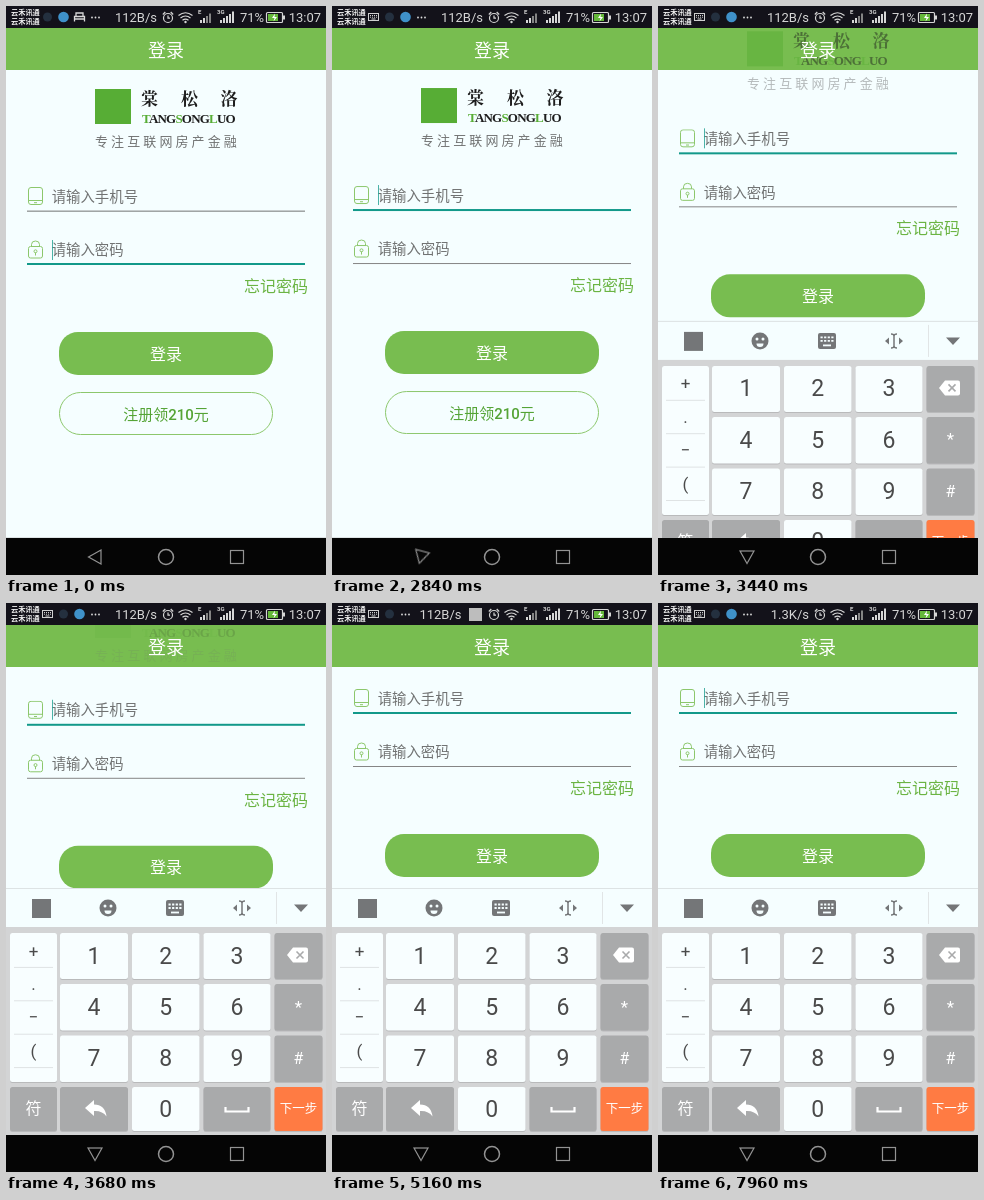
Animation of 320x569 px, one loop 8 s. Source, as an HTML page:

```html
<!DOCTYPE html>
<html lang="zh-CN">
<head>
<meta charset="utf-8">
<title>登录</title>
<style>
html, body { margin: 0; width: 100%; height: 100%; overflow: hidden; background: #000; }
svg { display: block; width: 100vw; height: 100vh; }
text { font-family: Roboto, "Noto Sans CJK SC", "Noto Sans CJK", sans-serif; }
.mid { text-anchor: middle; }
.end { text-anchor: end; }
.serif { font-family: "Liberation Serif", "Noto Serif CJK SC", "Noto Serif", "Noto Sans CJK SC", serif; font-weight: bold; }
.line { fill: none; stroke: #8cc76c; stroke-width: 1; }
.hint { font-size: 14.4px; fill: #707272; }
.teal { fill: #12998a; }
.nav { fill: none; stroke: #939393; stroke-width: 1.2; }

/* smooth motion */
.form, .logo, .fade, .keyboard, .back { animation: 8s linear infinite; }
.form, .logo { animation-name: lift; }
.fade { animation-name: fade; }
.keyboard { animation-name: rise; }
.back { animation-name: turn; transform-origin: 89px 551px; }
@keyframes lift {
  0%, 34.55% { transform: none; animation-timing-function: cubic-bezier(.37, 0, .63, 1); }
  49.45%, 100% { transform: translateY(-95px); }
}
@keyframes fade {
  0%, 36.5% { opacity: 1; animation-timing-function: cubic-bezier(.37, 0, .63, 1); }
  49.25%, 100% { opacity: 0; }
}
@keyframes rise {
  0%, 40% { transform: translateY(246px); animation-timing-function: cubic-bezier(.333, .667, .667, 1); }
  44.625%, 100% { transform: none; }
}
@keyframes turn {
  0%, 33% { transform: none; animation-timing-function: ease-in-out; }
  36.5%, 100% { transform: rotate(-90deg); }
}

/* hard switches */
.before, .after, .phoneOn, .phoneOff, .caret, .passOn, .passOff,
.notice, .ball, .dots, .slow, .fast, .shift, .ime { animation: 8s step-end infinite; }
.before, .passOn { animation-name: untilTyping; }
.after, .passOff { animation-name: fromTyping; }
.phoneOn { animation-name: fromTap; }
.phoneOff { animation-name: untilTap; }
.caret { animation-name: caret; }
.notice { animation-name: notice; }
.ball { animation-name: ball; }
.dots { animation-name: dots; }
.slow { animation-name: slow; }
.fast { animation-name: fast; }
.shift { animation-name: shift; }
.ime { animation-name: ime; }
@keyframes untilTyping { 0% { opacity: 1 } 33%, 100% { opacity: 0 } }
@keyframes fromTyping { 0% { opacity: 0 } 33%, 100% { opacity: 1 } }
@keyframes fromTap { 0% { opacity: 0 } 23.5%, 100% { opacity: 1 } }
@keyframes untilTap { 0% { opacity: 1 } 23.5%, 100% { opacity: 0 } }
@keyframes caret { 0% { opacity: 0 } 23.5% { opacity: 1 } 57% { opacity: 0 } 79.5%, 100% { opacity: 1 } }
@keyframes notice { 0% { transform: none } 33%, 100% { transform: translateX(16px) } }
@keyframes ball { 0% { opacity: 1 } 64.5% { opacity: 0 } 79.5%, 100% { opacity: 1 } }
@keyframes dots { 0% { transform: none } 64.5% { transform: translateX(-16px) } 79.5%, 100% { transform: none } }
@keyframes slow { 0% { opacity: 1 } 90%, 100% { opacity: 0 } }
@keyframes fast { 0% { opacity: 0 } 90%, 100% { opacity: 1 } }
@keyframes shift { 0% { transform: none } 64.5% { transform: translateX(-21.5px) } 79.5%, 100% { transform: none } }
@keyframes ime { 0% { opacity: 0 } 64.5% { opacity: 1 } 79.5%, 100% { opacity: 0 } }
</style>
</head>
<body>
<svg viewBox="0 0 320 569" preserveAspectRatio="none">
  <rect width="320" height="569" fill="#f5feff"/>
  <rect y="22" width="320" height="42" fill="#78bd50"/>

  <g class="logo"><g class="fade">
    <rect x="89" y="83" width="36" height="35" fill="#57ad35"/>
    <g class="mid" font-size="17" fill="#1d1d1d">
      <text class="serif" x="143.5" y="98.5">棠</text>
      <text class="serif" x="183.5" y="98.5">松</text>
      <text class="serif" x="223" y="98.5">洛</text>
    </g>
    <text class="serif" x="136" y="117" font-size="13" letter-spacing="-.8" fill="#1d1d1d"><tspan fill="#57ad35">T</tspan>ANG<tspan fill="#57ad35">S</tspan>ONG<tspan fill="#57ad35">L</tspan>UO</text>
    <text x="89" y="140" font-size="13" letter-spacing="3.1" fill="#707272">专注互联网房产金融</text>
  </g></g>
  <text class="mid" x="160" y="50.5" font-size="18" font-weight="500" fill="#fff">登录</text>

  <g class="form">
    <g class="line">
      <rect x="22.5" y="181.5" width="14" height="17" rx="2.5"/>
      <path d="M22.5 194.5h14M28 196.700h3"/>
      <rect x="22.5" y="240.5" width="14" height="11.5" rx="2"/>
      <path d="M25.5 240.5v-2a4 3.5 0 0 1 8 0v2M29.5 246.5v3"/>
      <circle cx="29.5" cy="245.3" r="1.5"/>
    </g>
    <text class="hint" x="45.7" y="195.5">请输入手机号</text>
    <text class="hint" x="45.7" y="249.3">请输入密码</text>
    <rect class="phoneOff" x="21" y="204.6" width="278" height="1.1" fill="#7d7f7f"/>
    <rect class="phoneOn teal" x="21" y="204" width="278" height="2"/>
    <rect class="caret teal" x="46" y="180" width="1" height="20" fill-opacity=".75"/>
    <rect class="passOff" x="21" y="258" width="278" height="1" fill="#858585"/>
    <g class="passOn teal">
      <rect x="21" y="257" width="278" height="2"/>
      <rect x="46" y="234" width="1" height="20" fill-opacity=".75"/>
    </g>
    <text class="end" x="302" y="286" font-size="16" fill="#6bb443">忘记密码</text>
    <rect x="53" y="326" width="214" height="43" rx="19" fill="#78bd50"/>
    <text class="mid" x="160" y="353.5" font-size="16" font-weight="500" fill="#fff">登录</text>
    <rect class="line" x="53.5" y="386.5" width="213" height="42" rx="21"/>
    <text class="mid" x="160" y="413.5" font-size="15" font-weight="500" fill="#55a436">注册领210元</text>
  </g>

  <g class="keyboard">
    <rect y="285" width="320" height="40" fill="#f5feff"/>
    <rect y="285" width="320" height="1" fill="#dde3e4"/>
    <rect y="324" width="320" height="208" fill="#d3d4d5"/>
    <g fill="#747678">
      <rect x="26" y="296" width="19" height="19"/>
      <circle cx="102" cy="305" r="8.5"/>
      <rect x="160" y="297" width="18" height="16" rx="2"/>
      <path d="M288 301.5h14l-7 7.5zM231 301.5v7l-4-3.5zM241 301.5v7l4-3.5z"/>
    </g>
    <path d="M233 298q3 0 3 2v10q0 2-3 2M239 298q-3 0-3 2v10q0 2 3 2" fill="none" stroke="#747678" stroke-width="1.5"/>
    <g fill="#f5feff">
      <circle cx="99" cy="303" r="1.5"/><circle cx="105" cy="303" r="1.5"/>
      <path d="M98.5 307.5h7a3.5 3.5 0 0 1-7 0z"/>
    </g>
    <path d="M162.5 301.5h13M162.5 305h13" stroke="#f5feff" stroke-width="1.8" stroke-dasharray="2.2 1.4"/>
    <path d="M165 309.5h8" stroke="#f5feff" stroke-width="1.8"/>
    <rect x="270" y="289" width="1" height="32" fill="#e1e5e6"/>
    <g id="keys"></g>
    <g fill="#fff">
      <path d="M281 352l6-7.5h13q2 0 2 2v11q0 2-2 2h-13z"/>
      <path d="M79 505l9-8v4.5q11 0 12.5 12q-4-6-12.5-5.5v5z"/>
    </g>
    <path d="M290.5 348.5l7 7m0-7l-7 7" stroke="#a9aaab" stroke-width="1.6"/>
    <path d="M219.5 504v4.5h23v-4.5" fill="none" stroke="#fff" stroke-width="2.2"/>
  </g>

  <rect width="320" height="22" fill="#13121a"/>
  <g font-size="7.2" font-weight="bold" fill="#f2f2f2">
    <text x="5" y="8.8">云禾讯通</text>
    <text x="5" y="18.2">云禾讯通</text>
  </g>
  <g class="before" fill="none" stroke="#d8d8d8" stroke-width="1.3">
    <path d="M70 10v-3h7v3M68.5 15.5v-5h10v5M68.5 13h10"/>
  </g>
  <g class="after" stroke="#cfcfcf" fill="none">
    <rect x="36.5" y="7.5" width="10" height="7"/>
    <path d="M38 9.5h7M38 11.2h7" stroke-dasharray="1 1"/><path d="M39.5 13h4"/>
  </g>
  <g class="notice">
    <circle cx="41.5" cy="11" r="4.5" fill="#24303f"/>
    <circle class="ball" cx="57.5" cy="11" r="5.3" fill="#3f91c9"/>
  </g>
  <g class="dots" fill="#ddd">
    <circle cx="86" cy="11.5" r=".9"/><circle cx="89.5" cy="11.5" r=".9"/><circle cx="93" cy="11.5" r=".9"/>
  </g>
  <g font-size="13" fill="#d6d6d6">
    <g class="slow"><text class="shift end" x="151" y="16">112B/s</text></g>
    <text class="fast end" x="151" y="16">1.3K/s</text>
    <text x="234" y="16">71%</text>
    <text class="end" x="315" y="16">13:07</text>
  </g>
  <rect class="ime" x="137" y="5" width="13" height="13" fill="#bdbdbd"/>
  <g fill="none" stroke="#d6d6d6" stroke-width="1.2">
    <circle cx="162" cy="12" r="4.5"/>
    <path d="M162 9.5v2.700h2M156.800 8.5l2.5-2.5M167.200 8.5l-2.5-2.5"/>
    <path d="M172.5 9.5q7-5.5 14 0M174.5 12q5-4 10 0M176.5 14.3q3-2.4 6 0"/>
    <rect x="260.5" y="6.5" width="16" height="10" rx="1"/>
  </g>
  <g fill="#d6d6d6">
    <circle cx="179.5" cy="16" r="1.2"/>
    <path d="M194 14h2v3h-2zM197 12h2v5h-2z"/>
    <path d="M214 14h2v3h-2zM217 12h2v5h-2zM220 10h2v7h-2zM223 8h2v9h-2zM226 5.5h2v11.5h-2z"/>
    <rect x="277" y="9.5" width="2" height="4"/>
    <text x="192" y="8" font-size="6" font-weight="bold">E</text>
    <text x="211" y="8" font-size="6" font-weight="bold">3G</text>
  </g>
  <path d="M200 10h2v7h-2zM203 7.5h2v9.5h-2z" fill="#858585"/>
  <rect x="262" y="8" width="10" height="7" fill="#65b83a"/>
  <path d="M269 7.5l-3 4.5h2.5l-1 3.5 3.5-4.5h-2.5z" fill="#fff"/>

  <rect y="532" width="320" height="37" fill="#050505"/>
  <g class="nav">
    <path class="back" d="M82.5 551l12.5-7v14z"/>
    <circle cx="160" cy="551" r="7.5" stroke-width="1.5"/>
    <rect x="224.5" y="544.5" width="13" height="13"/>
  </g>
</svg>
<script>
const keys = document.getElementById('keys');
const WHITE = '#f8feff', GRAY = '#a9aaab', ORANGE = '#ff7b43', INK = '#4a4a4a';
const cols = [[4, 47], [54, 68], [126, 67.5], [197.5, 67], [268.5, 48]];
const rows = [[330, 46], [381, 46.5], [432.5, 46.5], [484, 44]];
let markup = '';

const box = (x, y, w, h, fill) => {
  markup += `<rect x="${x}" y="${y + 1}" width="${w}" height="${h}" rx="2.5" fill="#b9babb"/>` +
    `<rect x="${x}" y="${y}" width="${w}" height="${h}" rx="2.5" fill="${fill}"/>`;
};
const label = (s, x, y, size, fill) => {
  markup += `<text class="mid" x="${x}" y="${y}" font-size="${size}" fill="${fill}">${s}</text>`;
};
const key = (c, r, fill, s = '', size = 23, ink = INK) => {
  const [x, w] = cols[c], [y, h] = rows[r];
  box(x, y, w, h, fill);
  label(s, x + w / 2, y + h / 2 - 1 + size * .37, size, ink);
};

box(4, 330, 47, 149, WHITE);
['+', '.', '−', '('].forEach((s, i) => {
  const y = 330.5 + i * 33.4;
  label(s, 27.5, y + 23, 17, INK);
  markup += `<rect x="8" y="${y + 33.4}" width="39" height="1" fill="#dfe3e4"/>`;
});
for (let n = 0; n < 9; n++) key(1 + n % 3, Math.floor(n / 3), WHITE, n + 1);
key(4, 0, GRAY);
key(4, 1, GRAY, '*', 17, '#fff');
key(4, 2, GRAY, '#', 16, '#fff');
key(0, 3, GRAY, '符', 16, '#fff');
key(1, 3, GRAY);
key(2, 3, WHITE, '0');
key(3, 3, GRAY);
key(4, 3, ORANGE, '下一步', 12.5, '#fff');
keys.innerHTML = markup;
</script>
</body>
</html>
```
